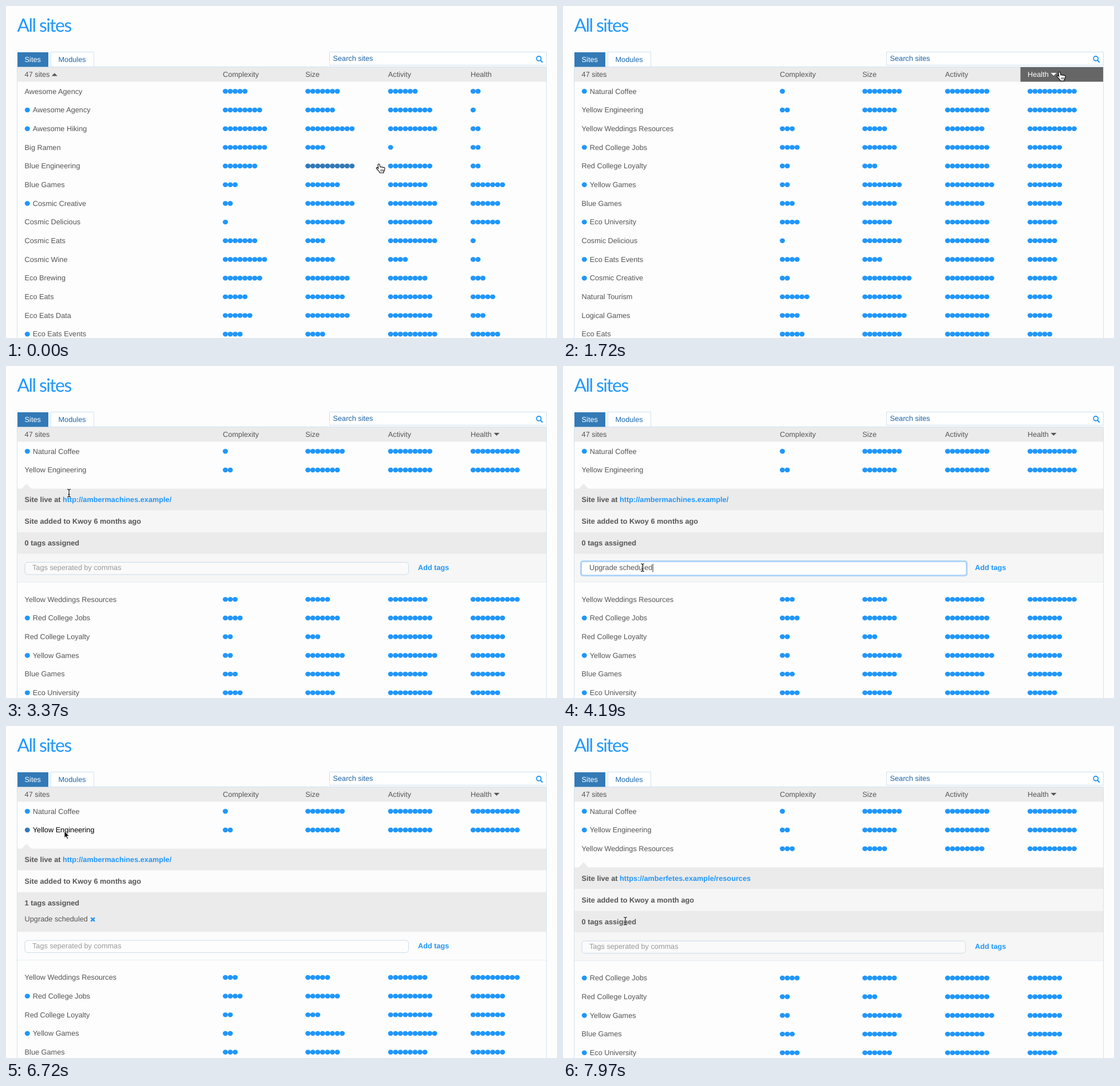
Write an HTML page that moves like this. It is 963 px wide and 581 px high and loops after 8 s.

```html
<!DOCTYPE html>
<html lang="en">
<head>
<meta charset="utf-8">
<title>All sites</title>
<style>
html, body { margin: 0; width: 100%; height: 100%; overflow: hidden; background: #fdfdfd; }
svg { display: block; font: 12.72px "Liberation Sans", Arial, sans-serif; text-rendering: geometricPrecision; }
text { white-space: pre; }
.title { font: 32px Lato, sans-serif; letter-spacing: -1.6px; }
.bold { font-weight: bold; }
</style>
</head>
<body>
<svg id="stage" width="963" height="581" viewBox="0 0 963 581"></svg>
<script>
const LOOP = 8000, PITCH = 32.69, TOP = 149.2;
const BLUE = '#2097fb', DARK = '#337ab7', GREY = '#555', EDGE = '#cfe3f1', BAR = '#ebebeb';
const columns = [32.6, 379, 523.3, 667.8, 812];
const edges = [20, 366, 511, 655, 799.5, 944];
const heads = ['47 sites', 'Complexity', 'Size', 'Activity', 'Health'];

// Name, then complexity, size, activity and health; a star marks a tagged site.
const sites = `Awesome Agency 5 7 6 2
*Awesome Agency 8 6 9 1
*Awesome Hiking 9 10 10 2
Big Ramen 9 4 1 2
Blue Engineering 7 10 9 2
Blue Games 3 7 8 7
*Cosmic Creative 2 10 10 6
Cosmic Delicious 1 8 9 6
Cosmic Eats 7 4 10 1
Cosmic Wine 9 6 4 2
Eco Brewing 8 9 8 3
Eco Eats 5 8 9 5
Eco Eats Data 6 9 9 3
*Eco Eats Events 4 4 10 6
*Natural Coffee 1 8 9 10
Yellow Engineering 2 7 9 10
Yellow Weddings Resources 3 5 8 10
*Red College Jobs 4 7 9 7
Red College Loyalty 2 3 9 7
*Yellow Games 2 8 10 7
*Eco University 4 6 9 6
Natural Tourism 6 8 9 5
Logical Games 4 9 9 5
Eco Weddings 8 6 9 1
Logical Hiking 9 7 8 1
*Natural Wine 7 9 10 1
Red Brewing 10 5 9 1
Yellow Ramen 8 8 6 1
Logical Coffee 6 9 9 2
*Red Tourism 7 4 8 2`.split('\n').map(line => {
  const [, star, name, nums] = line.match(/^(\*?)(\D+) (.+)$/);
  return { live: !!star, name, counts: nums.split(' ').map(Number) };
});
const byName = sites.slice(0, 14);
const lowest = [...sites].sort((a, b) => a.counts[3] - b.counts[3]).slice(0, 14);
const highest = [14, 15, 16, 17, 18, 19, 5, 20, 7, 13, 6, 21, 22, 11].map(i => sites[i]);

// Pointer moves: start, end, steps, x, y, shape
const moves = [
  [300, 650, 6, 867.5, 115.5, 'hand'],
  [2110, 2780, 12, 100, 176.5, 'hand'],
  [3280, 3600, 6, 139, 352.5, 'beam'],
  [4250, 4700, 8, 690, 355, 'beam'],
  [4760, 4960, 4, 760, 354.5, 'hand'],
  [5320, 5940, 10, 205, 343, 'arrow'],
  [6000, 6360, 7, 102, 184, 'hand'],
  [6540, 6541, 1, 102, 184, 'arrow'],
  [6780, 6781, 1, 102, 184, 'hand'],
  [6960, 7110, 3, 102, 214, 'hand'],
  [7530, 7970, 8, 109, 341, 'beam']
];

function pointerAt(t) {
  const c = { x: 651.5, y: 276.5, shape: 'hand' };
  for (const [start, end, steps, x, y, shape] of moves) {
    if (t < start) break;
    const k = Math.min(steps, Math.floor((t - start) / (end - start) * (steps - 1) + 1e-6) + 1);
    const p = k / steps, e = p * p * (3 - 2 * p);
    c.x += (x - c.x) * e;
    c.y += (y - c.y) * e;
    c.shape = shape;
  }
  return c;
}

const rect = (x, y, w, h, fill, more = '') =>
  `<rect x="${x}" y="${y}" width="${w}" height="${h}" fill="${fill}" ${more}/>`;
const text = (x, y, s, fill = GREY, cls = '') =>
  `<text x="${x}" y="${y}" fill="${fill}" class="${cls}">${s}</text>`;
const path = (d, fill, more = '') => `<path d="${d}" fill="${fill}" ${more}/>`;
const line = (d, color, width) => path(d, 'none', `stroke="${color}" stroke-width="${width}"`);
const dot = (x, y, fill) => `<ellipse cx="${x}" cy="${y}" rx="4.5" ry="4.2" fill="${fill}"/>`;

const shapes = {
  hand: path('M0 0c1 0 1.6.7 1.6 1.6L2.6 6c0-1.6 3-1.3 3 .2 0-1.2 2.6-1 2.7.4 .2-1 2.2-.8 2.2.8 0 3-.4 4.5-2 6.2v1.9H1.8c-.3-1.8-1.7-2.8-3.2-4.6-1-1.4-2.6-2.7-2.8-3.6-.2-1.4 1.6-1.7 2.8-.2l.6.7L-1.5 1.8C-1.6.7-1 0 0 0z', '#fff', 'stroke="#000" stroke-width="1.1"') +
    line('M3.6 9.5v3.5M5.6 9.5v3.5M7.6 9.5v3.5', '#000', .8),
  arrow: path('M0 0V12l2.8-2.6 2 4.6 2-.9-2-4.4h3.8z', '#000', 'stroke="#fff" stroke-width="1"'),
  beam: ['#fff 3', '#111 1.2'].map(s =>
    line('M-3-6.5Q0-6.5 0-4.5Q0-6.5 3-6.5M0-5V5.5M-3 7Q0 7 0 5Q0 7 3 7M-1.5 2.5h3', ...s.split(' '))).join('')
};

const page =
  text(19.5, 45, 'All sites', BLUE, 'title') +
  rect(19.5, 106.5, 925, 600, 'none', `stroke="${EDGE}"`) +
  rect(20, 81, 54, 25.5, DARK) + text(32.6, 98, 'Sites', '#fff') +
  rect(78.5, 80.5, 75, 26, '#fff', `stroke="${EDGE}"`) + text(91.5, 98, 'Modules', '#1b68ae') +
  rect(565.5, 80.5, 379, 23, '#fff', `stroke="${EDGE}"`) + text(571.5, 96.2, 'Search sites', '#1b62a5') +
  `<circle cx="931.2" cy="92" r="4" fill="none" stroke="${BLUE}" stroke-width="1.8"/>` +
  line('M934 95l3.8 3.8', BLUE, 2.2) +
  rect(20, 107, 924, 25.5, BAR);

function header(t, c) {
  const inside = c.y >= 107 && c.y < 132;
  const sorted = t < 1130 ? 0 : 4, up = t < 1720;
  return heads.map((label, i) => {
    const hot = inside && c.x >= edges[i] && c.x < edges[i + 1];
    const ink = hot ? '#fff' : GREY, x = i ? 852.5 : 79.8;
    return (hot ? rect(edges[i], 107, edges[i + 1] - edges[i], 25.5, '#666') : '') +
      text(columns[i], 124.3, label, ink) +
      (i === sorted ? path(up ? `M${x} 122.5h10l-5-5z` : `M${x} 117h10l-5 5z`, ink) : '');
  }).join('');
}

function row(site, y, live, c) {
  const over = i => Math.abs(c.y - y) < 16 && c.x >= edges[i] && c.x < edges[i + 1];
  let out = live ? dot(37.3, y + .1, over(0) ? DARK : BLUE) : '';
  out += text(live ? 46.8 : columns[0], y + 4.3, site.name, over(0) ? '#000' : GREY);
  site.counts.forEach((n, i) => {
    for (let k = 0; k < n; k++) out += dot(columns[i + 1] + 4.4 + k * 8.56, y + .1, over(i + 1) ? DARK : BLUE);
  });
  return out;
}

function panel(y, info, tagged, extra, t, c) {
  const pale = tagged ? '#fcfcfc' : '#f6f6f6';
  const top = y + 32.8, form = top + 114 + extra, mid = form + 28;
  const bar = (i, h, fill, s) =>
    rect(20, top + i * 38.1, 924, h, fill) + text(32.6, top + 23.4 + i * 38.1, s, GREY, 'bold');
  const focus = t >= 3830 && t < 5140, typed = t >= 4190 && t < 5140;
  const hot = c.x > 715 && c.y > 300;
  let out = path(`M27 ${top + .5}l9-9.3l9 9.3z`, BAR) +
    bar(0, 38, BAR, `Site live at <tspan fill="${BLUE}">${info.url}</tspan>`) +
    bar(1, 38.1, pale, `Site added to Kwoy ${info.age} ago`) +
    bar(2, 38 + extra, BAR, `${tagged ? 1 : 0} tags assigned`) +
    rect(20, form, 924, 49.5, pale) + rect(20, form + 49, 924, 1, '#e6ecf0');
  const x = 151.7, cy = top + 124;
  if (tagged) out += text(32.6, cy + 3.8, 'Upgrade scheduled') +
    line(`M${x - 3.3} ${cy - 3.3}l6.6 6.6m0-6.6l-6.6 6.6`, BLUE, 2.5);
  const y0 = mid - 23.8;
  out += focus
    ? rect(31.5, mid - 15, 674, 25, '#fff', 'rx="3.5" stroke="#aed3f8" stroke-width="3"')
    : rect(33, mid - 13.2, 670.5, 21.5, pale === '#fcfcfc' ? '#fdfdfd' : '#fafafa', 'rx="5" stroke="#c9dcea"');
  out += text(46, y0 + 24.2, typed ? 'Upgrade scheduled' : 'Tags seperated by commas', typed ? GREY : '#999');
  if (typed) out += rect(156.6, mid - 10.5, 1, 14.5, '#333');
  return out + text(720, y0 + 24.2, 'Add tags', hot ? '#2673bb' : BLUE, 'bold');
}

const details = {
  1: { url: 'http://ambermachines.example/', age: '6 months' },
  2: { url: 'https://amberfetes.example/resources', age: 'a month' }
};

function draw(t) {
  const c = pointerAt(t);
  const list = t < 1130 ? byName : t < 1720 ? lowest : highest;
  const open = t < 3010 ? -1 : t < 6780 ? 1 : t < 7410 ? -1 : 2;
  const loaded = open === 1 ? t >= 3070 : t >= 7470;
  const tagged = open === 1 && t >= 5140;
  const extra = tagged ? 31.6 : 0;
  const shift = open < 0 ? 0 : loaded ? 193.7 + extra : 177;
  let out = page + header(t, c);
  list.forEach((site, i) => {
    const y = TOP + i * PITCH + (open >= 0 && i > open ? shift : 0);
    const live = site.live || (t >= 5140 && i === 1);
    if (y < 600) out += row(site, y, live, c);
    if (i === open && loaded) out += panel(y, details[open], tagged, extra, t, c);
  });
  return out + `<g transform="translate(${c.x} ${c.y})">${shapes[c.shape]}</g>`;
}

const stage = document.getElementById('stage');
let last = '';
function tick() {
  const next = draw(performance.now() % LOOP);
  if (next !== last) stage.innerHTML = last = next;
  requestAnimationFrame(tick);
}
tick();
</script>
</body>
</html>
```
